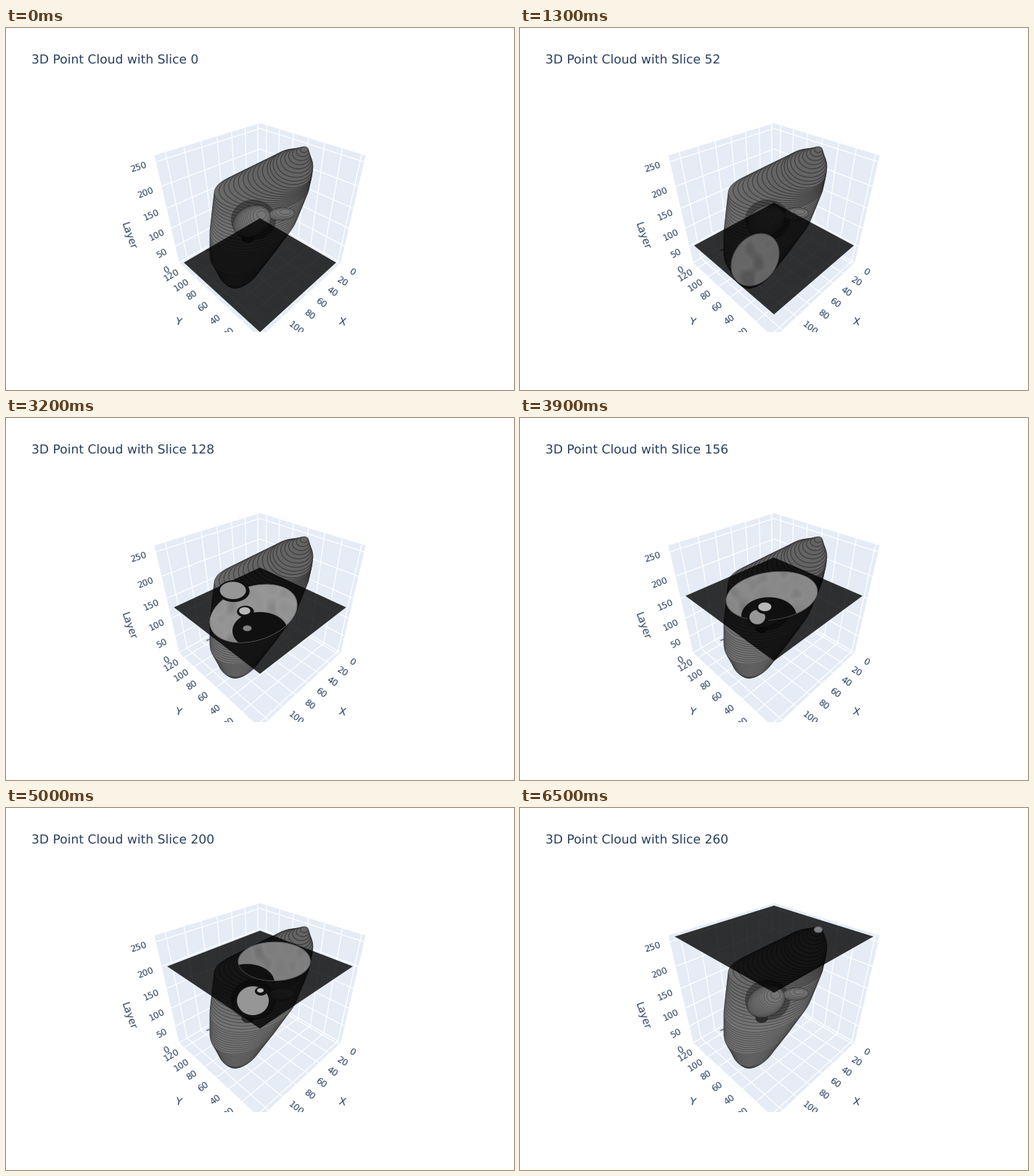
A matplotlib script for the animation above (6600 ms loop, 700x500 px).

```python
import numpy as np
import matplotlib.pyplot as plt
from matplotlib.animation import FuncAnimation
from matplotlib.collections import LineCollection, PolyCollection
from matplotlib.patches import Polygon
from matplotlib.path import Path

W, H, DPI = 700, 500, 100
FRAMES, STEP = 66, 4
INK, WALL = "#2a3f5f", "#E5ECF6"
PT = 72 / DPI
BOX, HALF = 0.5, 0.4715  # half widths of the box and of the slice in it
BOTTOM, TOP = 14, 264    # layers where the body begins and ends

plt.rcParams["font.family"] = "DejaVu Sans"
plt.rcParams["text.hinting"] = "none"
fig = plt.figure(figsize=(W / DPI, H / DPI), dpi=DPI, facecolor="white")
ax = fig.add_axes([80 / W, 80 / H, 540 / W, 320 / H])
ax.axis("off")


def project(x, y, z):
    """Perspective view along the box diagonal, in stage pixels."""
    depth = 2.165 - (x + y + z) / np.sqrt(3)
    up = z * np.sqrt(2 / 3) - (x + y) / np.sqrt(6)
    return 350 + 386 * (y - x) / np.sqrt(2) / depth, 260 - 386 * up / depth


def level(z):
    return z / 262.6 - 0.498


def across(v):
    return -HALF + 2 * HALF * v / 127


def gray(v):
    return str(np.clip(v / 255, 0, 1))


# ---- box, grid and labels ----
def draw_box():
    b = BOX
    walls = [
        [(b, -b, -b), (-b, -b, -b), (-b, -b, b), (b, -b, b)],
        [(-b, b, -b), (-b, -b, -b), (-b, -b, b), (-b, b, b)],
        [(b, b, -b), (-b, b, -b), (-b, -b, -b), (b, -b, -b)],
    ]
    ax.add_collection(PolyCollection(
        [[project(*p) for p in w] for w in walls], facecolors=WALL, zorder=0))
    lines = []
    for v in range(0, 121, 20):
        x, y = across(v), -across(v)
        lines += [[(x, -b, -b), (x, -b, b)], [(x, -b, -b), (x, b, -b)],
                  [(-b, y, -b), (-b, y, b)], [(-b, y, -b), (b, y, -b)]]
    for v in range(0, 251, 50):
        z = level(v)
        lines += [[(b, -b, z), (-b, -b, z)], [(-b, -b, z), (-b, b, z)]]
    ax.add_collection(LineCollection(
        [[project(*p) for p in l] for l in lines], colors="white",
        linewidths=1.3 * PT, zorder=1))


def label(text, at, angle, size=12):
    x, y = project(*at)
    ax.text(x, y + 1.4, text, rotation=angle, size=size * PT, color=INK,
            ha="center", va="center", clip_on=True, zorder=9)


def slope(p, q):
    """Screen angle from p to q, in degrees."""
    (x0, y0), (x1, y1) = project(*p), project(*q)
    return np.degrees(np.arctan2(y0 - y1, x1 - x0))


def draw_labels():
    b, far, out = BOX, BOX + 0.12, BOX + 0.32
    for v in range(0, 251, 50):
        z = level(v)
        label(v, (far, -b, z), slope((far, -b, z), (b, -b, z)))
    for v in range(0, 121, 20):
        x, y = across(v), -across(v)
        label(v, (far, y, -b), slope((far, y, -b), (b, y, -b)))
        label(v, (x, far, -b), slope((x, b, -b), (x, far, -b)))
    label("X", (0, out, -b), -12, 14)
    label("Y", (out, 0, -b), -12, 14)
    label("Layer", (out, -b, 0), slope((out, -b, 0.1), (out, -b, -0.1)), 14)


# ---- anatomy ----
def oval(cx, cy, rx, ry, skew=0.0, n=90):
    t = np.arange(n) * 2 * np.pi / n
    return np.c_[cx - rx * np.cos(t), cy - ry * np.sin(t + skew)]


# key sections: layer, centre, radii, skew
SECTIONS = np.array([
    (BOTTOM, 314, 354, 28, 24, 0), (52, 324, 320, 33, 36, -0.25),
    (88, 330, 299, 49, 41, -0.35), (128, 341, 270, 60, 40, -0.3),
    (180, 352, 225, 65, 28, -0.1), (224, 391, 196, 31, 25, 0.1),
    (260, 411, 168, 15, 11, 0)])


def section(z):
    """Outline of the body at layer z, rounded off at both tips."""
    cx, cy, rx, ry, skew = (np.interp(z, SECTIONS[:, 0], c)
                            for c in SECTIONS.T[1:])
    tip = np.sqrt(np.clip(min((z - BOTTOM) / 36, (TOP - z) / 30), 0, 1))
    return oval(cx, cy, rx * tip, ry * tip, skew)


def cavity(z):
    grow = np.clip((z - 96) / 28, 0, 1)
    return oval(350 - 0.25 * (z - 128), 294 - 0.73 * (z - 128),
                38 * grow, 26 * grow)


# organs: middle layer, half height, centre, radii, brightness
HEART = (129, 20, 313, 238, 18, 12, 150)
DUCT = (130, 16, 333, 290, 6, 4, 130)
LOBE = (196, 46, 339, 267, 22, 20, 150)
WING = (224, 18, 380, 257, 17, 8, 205)
VESSEL = (155, 52, 337, 261, 9, 6, 185)
ORGANS = [HEART, DUCT, LOBE, WING, VESSEL]


def organ(z, spec):
    """Cut of an ellipsoid that drifts with the layers, or None."""
    z0, h, cx, cy, rx, ry, _ = spec
    u = (z - z0) / h
    if abs(u) >= 1:
        return None
    r = np.sqrt(1 - u * u)
    return cx + 0.3 * (z - z0), cy - 0.2 * (z - z0), rx * r, ry * r


def draw_body():
    polys, fills, edges = [], [], []

    def add(poly, fill, edge):
        polys.append(poly)
        fills.append(fill)
        edges.append(edge)

    for z in range(BOTTOM + 2, TOP, STEP):
        high = np.clip((z - 130) / 80, 0, 1)
        add(section(z), gray(116 - 16 * high), (0.1, 0.1, 0.1, 0.36 + 0.2 * high))
    add(oval(341, 265, 31, 28), (0.1, 0.1, 0.1, 0.45), "none")
    add(oval(333, 290, 8, 6), gray(45), gray(30))
    for z in range(BOTTOM + 2, TOP, STEP):
        for spec in (LOBE, WING, VESSEL):
            cut = organ(z, spec)
            if cut and z >= 150:
                tone = 165 if spec is VESSEL and z > 190 else 116
                add(oval(*cut), gray(tone), (0.1, 0.1, 0.1, 0.3))
    ax.plot([277, 283], [307, 305], color="#7d8799", lw=2 * PT, zorder=2)
    ax.add_collection(PolyCollection(polys, facecolors=fills, edgecolors=edges,
                                     linewidths=1.1 * PT, zorder=3))


draw_box()
draw_labels()
draw_body()

# ---- moving slice ----
rng = np.random.default_rng(7)
WAVES = np.c_[rng.uniform(-0.22, 0.22, (9, 2)), rng.uniform(-0.03, 0.03, 9),
              rng.uniform(0, 2 * np.pi, 9)]
gx, gy = np.meshgrid(np.arange(270, 432), np.arange(150, 370))


def tissue(z):
    """Mean brightness of the cut and its mottled texture."""
    n = sum(np.sin(a * gx + b * gy + c * z + d) for a, b, c, d in WAVES) / 3
    base = np.interp(z, [30, 90, 128, 180], [75, 152, 150, 128])
    return base, base - 17 * np.clip(n, 0, 1.3) + 3 * n


plane = PolyCollection([], facecolors="black", alpha=0.8, linewidths=0, zorder=4)
flesh = ax.imshow(np.zeros(gx.shape), cmap="gray", vmin=0, vmax=255, zorder=5,
                  extent=(269.5, 431.5, 369.5, 149.5), aspect="auto",
                  interpolation="bilinear")
rim, = ax.plot([], [], lw=PT, zorder=5.5)
hollow = ax.add_patch(Polygon(cavity(128), fc=gray(16), lw=0, zorder=6))
cuts = PolyCollection([], linewidths=0, zorder=7)
ax.add_collection(plane, autolim=False)
ax.add_collection(cuts, autolim=False)
ax.set_xlim(80, 620)
ax.set_ylim(420, 100)
title = fig.text(35 / W, 1 - 50 / H, "", size=17.1 * PT, color=INK)


def update(i):
    z = i * STEP
    title.set_text(f"3D Point Cloud with Slice {z}")
    corners = [(-1, -1), (1, -1), (1, 1), (-1, 1)]
    plane.set_verts([[project(HALF * a, HALF * b, level(z)) for a, b in corners]])

    for part in (flesh, rim, hollow):
        part.set_visible(z > BOTTOM)
    ring = section(z)
    closed = np.vstack([ring, ring[:1]])
    base, shade = tissue(z)
    flesh.set_data(shade)
    hollow.set_xy(cavity(z))
    for part in (flesh, hollow):
        part.set_clip_path(Path(closed), transform=ax.transData)
    rim.set_data(*closed.T)
    rim.set_color(gray(base - 25))

    polys, fills = [], []
    for spec in ORGANS:
        cut = organ(z, spec)
        if cut:
            cx, cy, rx, ry = cut
            polys += [oval(cx + 1, cy + 1, rx + 4, ry + 3), oval(*cut)]
            fills += [gray(16), gray(spec[-1])]
    cuts.set_verts(polys)
    cuts.set_facecolor(fills)
    return title, plane, flesh, rim, hollow, cuts


anim = FuncAnimation(fig, update, frames=FRAMES, interval=100, repeat=True,
                     repeat_delay=0, blit=False)
plt.show()
```
